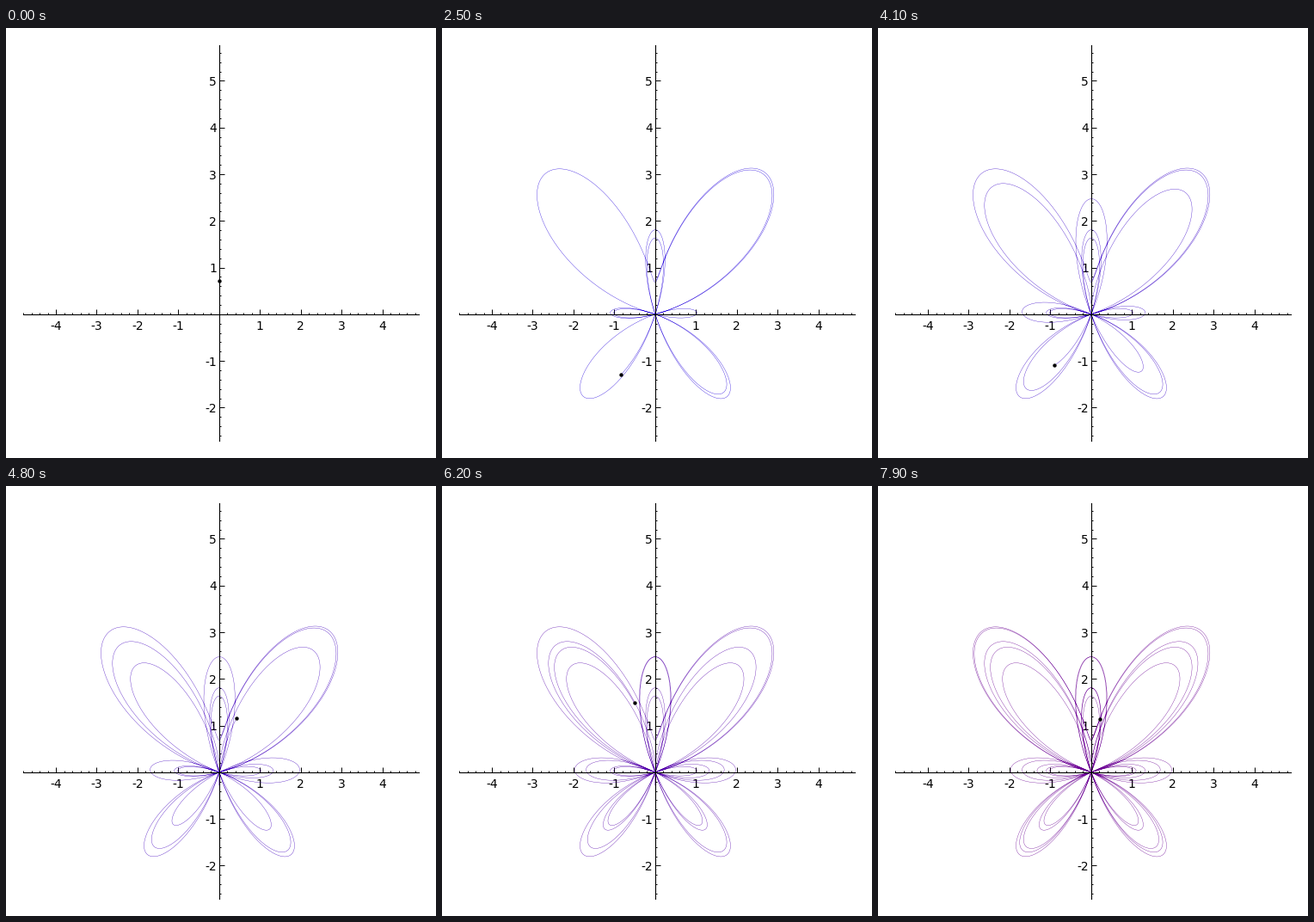
These frames come from a looping animation (500x500 px, 8000 ms). A matplotlib script:

```python
import numpy as np
import matplotlib.pyplot as plt
from matplotlib.animation import FuncAnimation

FRAMES, INTERVAL = 80, 100
STEP = 0.4                 # parameter advance per frame
PERIOD = 24 * np.pi        # full run of the colour ramp
ORIGIN = (247.9, 332.85)   # pixels, from the top left
UNIT = (47.47, 54.28)      # pixels per data unit
LOW, HIGH = 20, 480        # plot area in pixels

plt.rcParams["font.family"] = "DejaVu Sans"


def butterfly(t):
    r = np.exp(np.cos(t)) - 2 * np.cos(4 * t) - np.sin(t / 12) ** 5
    return r * np.sin(t), r * np.cos(t)


def set_ticks(axis, first, last):
    major = [i for i in range(first, last + 1) if i]
    minor = [i / 5 for i in range(first * 5 - 4, last * 5 + 5) if i % 5]
    axis.set_ticks(major, labels=[str(i) for i in major])
    axis.set_ticks(minor, minor=True)


fig = plt.figure(figsize=(5, 5), dpi=100, facecolor="white")
ax = fig.add_axes([0.04, 0.04, 0.92, 0.92])

for side in ("left", "bottom"):
    ax.spines[side].set_position("zero")
    ax.spines[side].set_linewidth(0.8)
for side in ("right", "top"):
    ax.spines[side].set_visible(False)

set_ticks(ax.xaxis, -4, 4)
set_ticks(ax.yaxis, -2, 5)
ax.tick_params(which="both", direction="in", width=0.7, labelsize=10)
ax.tick_params(which="major", length=4)
ax.tick_params(which="minor", length=1.4)
ax.tick_params(axis="x", pad=4.8)
ax.tick_params(axis="y", pad=2)

curve, = ax.plot([], [], lw=0.25, zorder=2)
dot = ax.scatter([0], [0], s=10, color="black", linewidths=0, zorder=5)

# Limits come last, since setting ticks can widen them.
ax.set_xlim((LOW - ORIGIN[0]) / UNIT[0], (HIGH - ORIGIN[0]) / UNIT[0])
ax.set_ylim((ORIGIN[1] - HIGH) / UNIT[1], (ORIGIN[1] - LOW) / UNIT[1])


def update(frame):
    end = frame * STEP
    mix = end / PERIOD
    curve.set_data(*butterfly(np.linspace(0, end, 40 * frame + 1)))
    curve.set_color((mix, 0, 1 - mix))
    dot.set_offsets([butterfly(end)])
    return curve, dot


anim = FuncAnimation(fig, update, frames=FRAMES, interval=INTERVAL,
                     repeat=True, repeat_delay=0)
plt.show()
```
